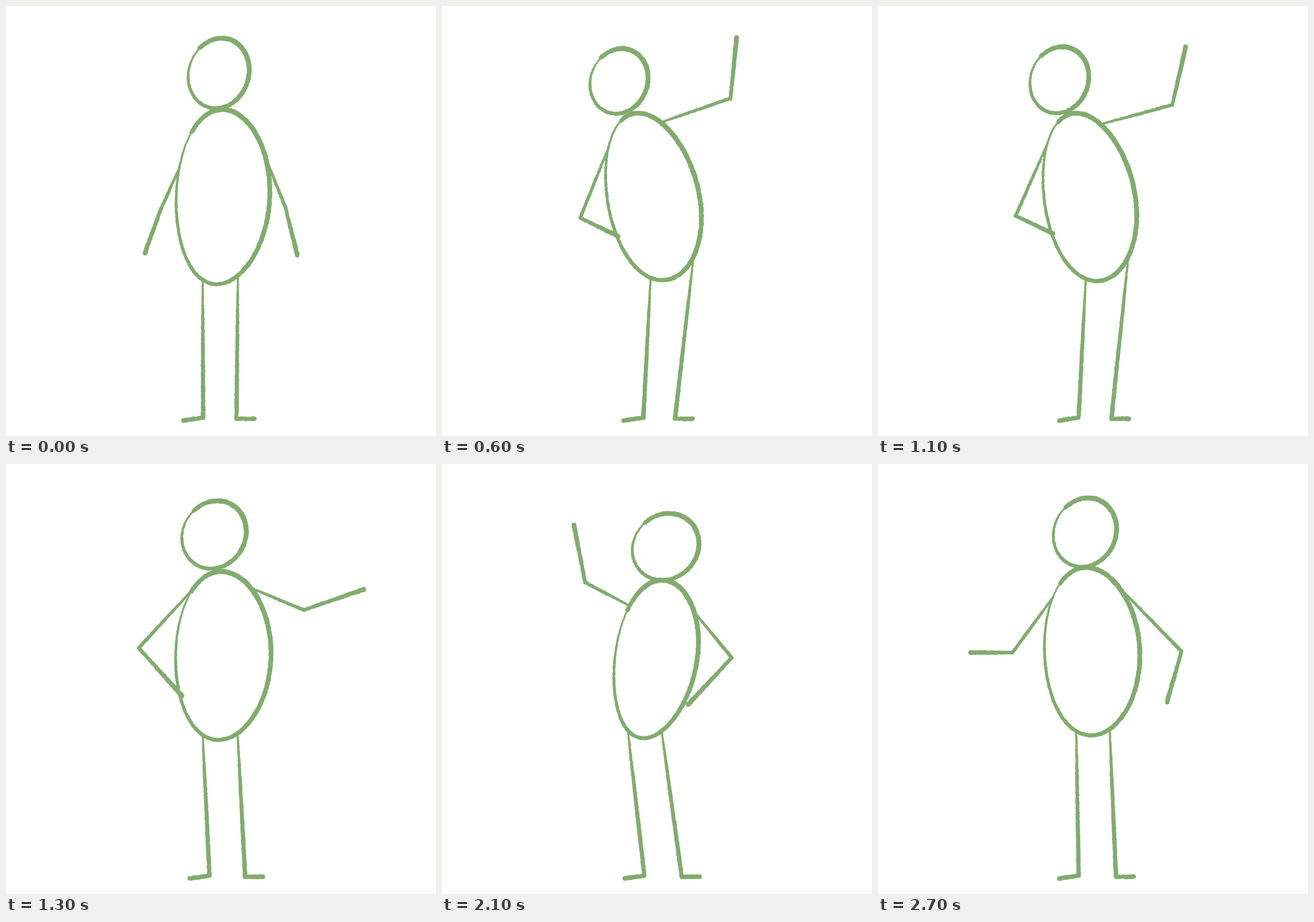
An HTML page with a canvas that plays this animation: 748x748 px, repeating every 2.8 s.

```html
<!DOCTYPE html>
<html lang="en">
<head>
<meta charset="utf-8">
<title>Gesturing stick figure</title>
<style>
  html, body { margin: 0; width: 100%; height: 100%; overflow: hidden; background: #fff; }
  canvas { display: block; }
</style>
</head>
<body>
<canvas id="stage" width="748" height="748"></canvas>
<script>
const ctx = document.getElementById('stage').getContext('2d');

// head: centre x, y, half width, half height; body: the same, then lean.
// left, right: shoulder angle on the body, elbow x, y, forearm degrees,
// forearm length, hip angle on the body, ankle x.
const rest = {
  head: [370, 117, 53, 61], body: [377.5, 332, 81.5, 152, -.06],
  left: [-2.75, 270, 352, 110, 83, 1.95, 343], right: [-.4, 486, 350, 76, 86, 1.18, 401]
};
const point = {
  head: [362, 123, 56, 59], body: [378, 333.5, 83, 146.5, -.03],
  left: [-2.2, 231, 320, 48, 113, 1.95, 354], right: [-.91, 518, 254, -19, 111, 1.2, 416]
};
const raise = {
  head: [328, 125.5, 52.5, 59.5], body: [369.5, 334, 78.5, 147, .16],
  left: [-2.52, 238, 359, 25, 69, 1.63, 347], right: [-1.14, 529, 191, -65, 102, .6, 407]
};
const lean = {
  head: [303, 132, 50, 56], body: [367.5, 331, 84.5, 145, .28],
  left: [-2.85, 241, 371, 26, 74, 1.54, 351], right: [-1.4, 495, 153, -89, 107, .53, 405]
};
const turn = {
  head: [360, 119, 55, 60], body: [372.5, 326, 83, 146, .05],
  left: [-2.5, 234, 328, 180, 73, 1.84, 349], right: [-.95, 528, 326, 106, 92, 1.13, 414]
};
const hail = {
  head: [389, 144, 58, 58], body: [372.5, 339.5, 73.5, 137.5, -.22],
  left: [-2.18, 249, 206, 259, 102, 2.24, 352], right: [-.42, 504, 337, 133, 111, 1.36, 417]
};

// Each gesture plays its steps out and back through its key poses.
const wave = { poses: [rest, point, raise, lean], steps: [0, .5, 1, 2, 2.5, 2.8, 3, 3.06], peak: 8 };
const greet = { poses: [rest, turn, hail], steps: [0, 1, 1.3, 1.65, 1.88, 2, 2.05], peak: 22 };

const mix = (a, b, f) => a + (b - a) * f;

function poseAt({ poses, steps }, step) {
  const pos = steps[step], i = Math.min(Math.floor(pos), poses.length - 2);
  const pose = {};
  for (const part in rest) {
    pose[part] = poses[i][part].map((v, k) => mix(v, poses[i + 1][part][k], pos - i));
  }
  return pose;
}

let seed;
function random() {
  seed = (seed * 1664525 + 1013904223) % 4294967296;
  return seed / 4294967296;
}

// Rough crayon stroke along path(0..1), with widths spread along it.
function crayon(path, length, widths) {
  const count = Math.ceil(length / 1.2), spans = widths.length - 1;
  ctx.beginPath();
  for (let k = 0; k <= count; k++) {
    const t = k / count, i = Math.min(Math.floor(t * spans), spans - 1);
    const r = mix(widths[i], widths[i + 1], t * spans - i) / 2 * (.88 + random() * .22);
    const [x, y] = path(t).map(v => v + random() * .8 - .4);
    ctx.moveTo(x + r, y);
    ctx.arc(x, y, r, 0, 7);
  }
  ctx.fill();
}

const line = ([x0, y0], [x1, y1], ...widths) =>
  crayon(t => [mix(x0, x1, t), mix(y0, y1, t)], Math.hypot(x1 - x0, y1 - y0), widths);

// Slanted oval; bow pulls its top and bottom to the left.
const oval = ([x, y, rx, ry, slant], angle, bow) =>
  [x + rx * Math.cos(angle) - bow * Math.sin(angle) ** 2, y + ry * Math.sin(angle + slant)];

const loopStroke = (shape, bow) =>
  crayon(t => oval(shape, -2.25 + t * 2 * Math.PI, bow), Math.PI * (shape[2] + shape[3]),
    [7, 8.5, 8.5, 8, 7, 6, 5, 3]);

function limbs(body, [shoulder, elbowX, elbowY, degrees, reach, hip, ankleX], ankleY, toe) {
  const elbow = [elbowX, elbowY], ankle = [ankleX, ankleY], bend = degrees * Math.PI / 180;
  line(oval(body, shoulder, 6), elbow, 4, 5.5, 6);
  line(elbow, [elbowX + reach * Math.cos(bend), elbowY + reach * Math.sin(bend)], 6, 7, 8);
  line(oval(body, hip, 6), ankle, 3.5, 6, 7, 7.5);
  line(ankle, [ankleX + toe[0], ankleY + toe[1]], 7, 8);
}

function draw(tick) {
  const gesture = tick < 16 ? wave : greet;
  const step = Math.max(0, gesture.steps.length - 1 - Math.abs(gesture.peak - tick));
  const { head, body, left, right } = poseAt(gesture, step);
  seed = step ? gesture.peak * 100 + step : 1;
  ctx.fillStyle = '#fff';
  ctx.fillRect(0, 0, 748, 748);
  ctx.fillStyle = '#82ab6e';
  loopStroke([...head, -.1], 0);
  loopStroke(body, 6);
  limbs(body, left, 716, [-34, 5]);
  limbs(body, right, 718, [31, 0]);
}

let shown = -1;
function loop() {
  const tick = Math.floor(performance.now() / 100) % 28;
  if (tick !== shown) draw(shown = tick);
  requestAnimationFrame(loop);
}
loop();
</script>
</body>
</html>
```
